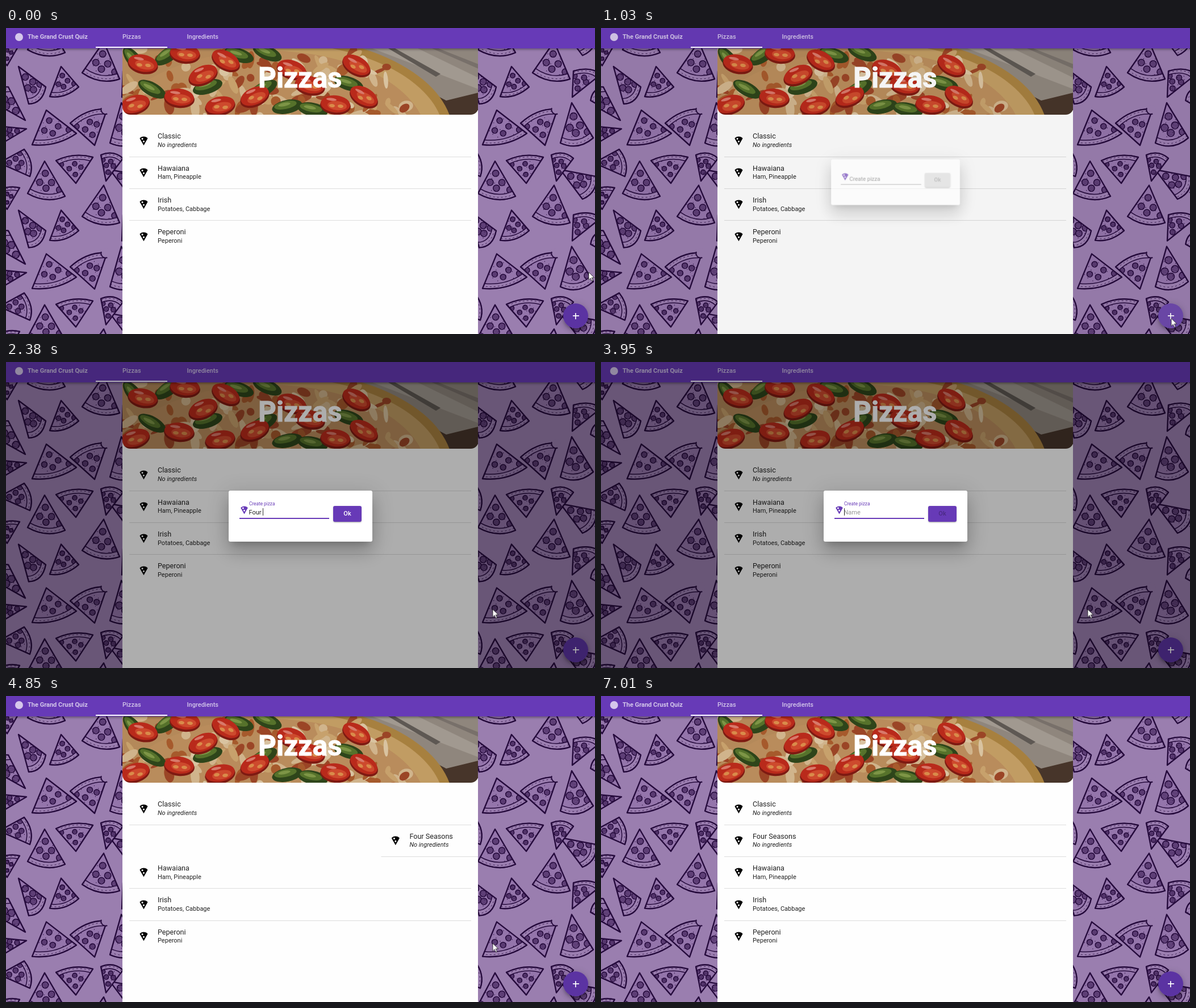
Animation of 1037 by 540 pixels, one loop 7.1 s. Source, as an HTML page with a canvas:

```html
<!DOCTYPE html>
<html lang="en">
<head>
<meta charset="utf-8">
<title>Pizzas</title>
<style>
:root { --purple: #673ab7; --swift: cubic-bezier(.25,.8,.25,1); }
html, body { margin: 0; width: 100%; height: 100%; overflow: hidden; }
body { position: relative; background: #9a7eaf; font: 11px/16px Roboto, Arial, sans-serif; color: rgba(0,0,0,.87); }
body * { box-sizing: border-box; }
.abs, header, main, .fab, .backdrop, .dialog, .cursor, header *, .row *, .dialog * { position: absolute; }
span, h1 { white-space: pre; }
.loop, .loop::after { animation: 7100ms linear infinite; }

header { left: 0; top: 0; width: 1037px; height: 35.5px; background: var(--purple); color: rgba(255,255,255,.72);
  font-weight: 500; box-shadow: 0 2px 4px rgba(0,0,0,.35); z-index: 1; }
header span { top: 8px; }
.brand { left: 38px; font-weight: 700; }
.mark { left: 16px; top: 9px; width: 14px; height: 14px; border-radius: 50%; background: #d5c7eb; }
.ink { left: 158px; top: 33px; width: 125.5px; height: 2px; background: #fff; }

main { left: 204.5px; top: 36px; width: 626.5px; height: 504px; background: #fefefe; overflow: hidden; }
#photo { left: 0; top: 0; border-radius: 0 0 14px 14px; }
h1 { left: 0; top: 22px; width: 100%; margin: 0; text-align: center; font-size: 49.5px; line-height: 60px;
  font-weight: 700; color: #fff; -webkit-text-stroke: .9px #fff; }
.list { left: 12.5px; top: 135.3px; width: 602px; }
.row { position: relative; height: 56.4px; border-bottom: 1px solid rgba(0,0,0,.13); }
.row:last-child { border: 0; }
.row svg { left: 15.6px; top: 18.3px; width: 18.9px; height: 18.9px; }
.row b, .row span, .row i { left: 50px; white-space: pre; }
.row b { top: 12px; font-size: 12.6px; font-weight: 400; }
.row span, .row i { top: 27.6px; }
.slot { height: 0; animation-name: grow; }
.fresh { animation-name: slide; }
@keyframes grow { 0%, 57.789% { height: 0; } 66.127%, 100% { height: 56.4px; } }
@keyframes slide {
  0%, 57.788% { transform: translateX(602px); visibility: hidden; }
  57.789%, 66.127% { transform: translateX(602px); visibility: visible; }
  74.465%, 100% { transform: none; visibility: visible; }
}

.fab { left: 981px; top: 486px; width: 44px; height: 44px; border-radius: 50%; background: #5b33a2; overflow: hidden; }
.shade { left: 981px; top: 486px; width: 44px; height: 44px; border-radius: 50%;
  box-shadow: 0 3px 4px -1px rgba(0,0,0,.2), 0 5px 8px rgba(0,0,0,.16), 0 1px 14px rgba(0,0,0,.14); }
.fab::before { content: ""; position: absolute; left: 16.5px; top: 16.5px; width: 11px; height: 11px;
  background: linear-gradient(#fff, #fff) 50%/100% 1.7px no-repeat, linear-gradient(#fff, #fff) 50%/1.7px 100% no-repeat; }
.fab::after { content: ""; position: absolute; left: -22px; top: -16px; width: 96px; height: 96px; border-radius: 50%;
  background: #fff; animation-name: ripple; }
@keyframes ripple {
  0%, 11.2% { transform: scale(0); opacity: .13; animation-timing-function: cubic-bezier(0,0,.2,1); }
  13.8% { transform: none; opacity: .13; }
  19.2%, 100% { transform: none; opacity: 0; }
}

.backdrop { inset: 0; background: rgba(0,0,0,.32); z-index: 2; animation-name: dim; }
@keyframes dim {
  0%, 13.873% { opacity: 0; animation-timing-function: var(--swift); }
  19.507% { opacity: 1; }
  55.873% { opacity: 1; animation-timing-function: var(--swift); }
  61.507%, 100% { opacity: 0; }
}
.dialog { left: 391.5px; top: 227px; width: 253px; height: 90px; background: #fff; border-radius: 3px; z-index: 3;
  box-shadow: 0 9px 12px -6px rgba(0,0,0,.2), 0 19px 30px 2px rgba(0,0,0,.14), 0 7px 36px 6px rgba(0,0,0,.12);
  animation-name: pop; }
@keyframes pop {
  0%, 13.873% { opacity: 0; transform: scale(.7); animation-timing-function: cubic-bezier(0,0,.2,1); }
  15.986% { opacity: 1; transform: none; }
  55.845% { opacity: 1; transform: none; animation-timing-function: cubic-bezier(.4,0,.2,1); }
  56.901%, 100% { opacity: 0; transform: none; }
}
.dialog svg { left: 18.5px; top: 25.5px; width: 17px; height: 17px; fill: var(--purple); }
.label { left: 35.5px; top: 15.5px; color: var(--purple); transform-origin: 0 50%; animation-name: float; }
@keyframes float {
  0%, 15.915% { transform: translateY(15.4px); color: rgba(0,0,0,.54); animation-timing-function: var(--swift); }
  21.549%, 100% { transform: scale(.75); color: var(--purple); }
}
.hint { left: 35.5px; top: 30.5px; color: rgba(0,0,0,.42); animation-name: hint; }
@keyframes hint {
  0%, 15.915% { opacity: 0; animation-timing-function: var(--swift); }
  21.549%, 100% { opacity: 1; }
}
#typed { left: 35.5px; top: 30.5px; border-right: 1px solid #333; height: 13px; line-height: 16px; animation-name: caret; }
@keyframes caret { 0%, 15.985% { visibility: hidden; } 15.986%, 100% { visibility: visible; } }
.rule { left: 18.5px; top: 49px; width: 158px; height: 1px; background: rgba(0,0,0,.42); }
.focus { left: 18.5px; top: 48px; width: 158px; height: 2px; background: var(--purple); animation-name: focus; }
@keyframes focus {
  0%, 15.915% { transform: scaleX(.5); opacity: 0; animation-timing-function: var(--swift); }
  20.14%, 100% { transform: none; opacity: 1; }
}
.ok { left: 184px; top: 26.5px; width: 50px; height: 28.5px; border-radius: 3px; text-align: center; line-height: 28px;
  font-weight: 500; box-shadow: 0 2px 2px -1px rgba(0,0,0,.2), 0 1px 3px rgba(0,0,0,.2); animation-name: enable; }
@keyframes enable {
  0%, 23.52% { background: #dedede; color: rgba(0,0,0,.28); }
  23.521% { background: #dedede; color: #fff; animation-timing-function: var(--swift); }
  29.155%, 55.56% { background: #673ab7; color: #fff; }
  55.563% { background: #673ab7; color: rgba(0,0,0,.28); }
  55.7% { background: #673ab7; color: rgba(0,0,0,.28); animation-timing-function: var(--swift); }
  61.2%, 100% { background: #dedede; color: rgba(0,0,0,.28); }
}

.cursor { left: 0; top: 0; width: 13px; height: 18px; z-index: 4; animation-name: move; }
@keyframes move {
  0%, 1.65% { transform: translate(1025px,430px); animation-timing-function: ease-in-out; }
  5.775%, 14.085% { transform: translate(1006px,513px); animation-timing-function: ease-in-out; }
  18.451%, 86.75% { transform: translate(856px,435.5px); animation-timing-function: ease-in; }
  90.141%, 100% { transform: translate(955px,541px); }
}
</style>
</head>
<body>
<svg width="0" height="0" class="abs"><symbol id="slice" viewBox="0 0 24 24"><path d="M12 2C8.43 2 5.23 3.54 3.01 6L12 22l8.99-16C18.78 3.55 15.57 2 12 2zM7 7c0-1.1.9-2 2-2s2 .9 2 2-.9 2-2 2-2-.9-2-2zm5 8c-1.1 0-2-.9-2-2s.9-2 2-2 2 .9 2 2-.9 2-2 2z"/></symbol></svg>
<canvas id="wall" class="abs" style="left:0;top:0" width="1037" height="540"></canvas>
<header>
  <div class="mark"></div><span class="brand">The Grand Crust Quiz</span>
  <span style="left:205px">Pizzas</span><span style="left:318.5px">Ingredients</span>
  <div class="ink"></div>
</header>
<main>
  <canvas id="photo" class="abs" width="627" height="117"></canvas>
  <h1 class="abs">Pizzas</h1>
  <div class="list abs">
    <div class="row"><svg><use href="#slice"/></svg><b>Classic</b><i>No ingredients</i></div>
    <div class="slot loop"><div class="row fresh loop" style="border-bottom:1px solid rgba(0,0,0,.13)"><svg><use href="#slice"/></svg><b>Four Seasons</b><i>No ingredients</i></div></div>
    <div class="row"><svg><use href="#slice"/></svg><b>Hawaiana</b><span>Ham, Pineapple</span></div>
    <div class="row"><svg><use href="#slice"/></svg><b>Irish</b><span>Potatoes, Cabbage</span></div>
    <div class="row"><svg><use href="#slice"/></svg><b>Peperoni</b><span>Peperoni</span></div>
  </div>
</main>
<div class="shade abs"></div>
<div class="fab loop"></div>
<div class="backdrop loop"></div>
<div class="dialog loop">
  <svg><use href="#slice"/></svg>
  <span class="label loop">Create pizza</span>
  <span class="hint loop" id="hint">Name</span>
  <span class="loop" id="typed"></span>
  <div class="rule"></div><div class="focus loop"></div>
  <div class="ok loop">Ok</div>
</div>
<svg class="cursor loop" viewBox="0 0 13 18"><path d="M1 1v13.5l3.2-3 2.2 5 2.1-.9-2.2-4.9h4.4z" fill="#fff" stroke="#222" stroke-width=".8"/></svg>
<script>
const $ = id => document.getElementById(id);
const mix = (p, q, k) => [p[0] + (q[0] - p[0]) * k, p[1] + (q[1] - p[1]) * k];
let seed = 7;
const rnd = () => (seed = seed * 16807 % 2147483647) / 2147483647;

// Wallpaper: each slice is tip, crust end, crust end inside one repeating tile
const slices = [
  [22,68, 70,104, 40,134], [97,68, 128,104, 77,121], [172,24, 200,90, 134,79],
  [71,145, 124,186, 46,206], [156,207, 113,168, 178,143], [-12,238, 32,214, 42,262],
  [68,235, 104,297, 38,292], [123,274, 88,234, 153,228], [183,250, 246,262, 222,302],
  [203,132, 241,194, 183,203], [204,122, 206,76, 254,82], [176,270, 167,224, 206,230],
  [34,163, -28,128, 4,104], [36,178, -14,173, -6,203], [2,320, -20,290, 24,282]
];
const bite = 4, tileW = 264.33, tileH = 253.6, dark = '#250a3c', tint = '#9a7eaf';

function drawSlice(c, p, bitten) {
  const T = [p[0], p[1]], A = [p[2], p[3]], B = [p[4], p[5]];
  const mid = mix(A, B, .5), size = Math.hypot(mid[0] - T[0], mid[1] - T[1]);
  const bulge = k => mix(T, mid, k * 1.28);
  const arc = k => c.quadraticCurveTo(...bulge(k), ...mix(T, B, k));
  const at = (k, s) => mix(mix(T, A, k), mix(T, B, k), s);
  const dot = (q, r) => { c.beginPath(); c.arc(q[0], q[1], r, 0, 7); };
  const outline = () => { c.beginPath(); c.moveTo(...T); c.lineTo(...A); arc(1); c.closePath(); };
  c.save();
  c.lineJoin = 'round';
  c.strokeStyle = dark;
  outline(); c.fillStyle = '#9475ab'; c.fill();
  c.save(); c.clip();
  for (const [k, s] of [[.36, .5], [.62, .25], [.64, .75], [.8, .5], [.82, .06]]) {
    const q = at(k, s), r = size * .095;
    dot(q, r); c.fillStyle = '#7c5b95'; c.fill(); c.lineWidth = 1.5; c.stroke();
    c.lineWidth = .8;
    c.beginPath();
    for (let d = -.6; d < .9; d += .4) {
      const h = Math.sqrt(1 - d * d) * r;
      c.moveTo(q[0] - h, q[1] + d * r); c.lineTo(q[0] + h, q[1] + d * r - 1);
    }
    c.stroke();
  }
  for (let i = 0; i < 16; i++) { dot(at(.25 + i / 16 * .72, i * .618 % 1), .7); c.fillStyle = dark; c.fill(); }
  c.restore();
  // crust band
  c.beginPath(); c.moveTo(...mix(T, A, .86)); arc(.86); c.lineTo(...B);
  c.quadraticCurveTo(...bulge(1), ...A); c.closePath();
  c.fillStyle = '#9b7eb0'; c.fill(); c.lineWidth = 1.5; c.stroke();
  c.lineWidth = .8; c.setLineDash([3, 4]);
  c.beginPath(); c.moveTo(...mix(T, A, .94)); arc(.94); c.stroke();
  c.setLineDash([]);
  outline(); c.lineWidth = 2.4; c.stroke();
  if (bitten) {
    dot(mix(B, mid, .08), 8); c.fillStyle = tint; c.fill();
    c.beginPath(); c.arc(...mix(B, mid, .08), 8, 1.2, 3.5); c.lineWidth = 2; c.stroke();
  }
  c.restore();
}

const wall = $('wall').getContext('2d');
wall.fillStyle = tint;
wall.fillRect(0, 0, 1037, 540);
for (let i = -1; i < 5; i++) for (let j = -1; j < 3; j++) {
  wall.save();
  wall.translate(i * tileW, j * tileH);
  slices.forEach((p, n) => drawSlice(wall, p, n === bite));
  wall.restore();
}

// Banner: flat impression of a pizza on a table
const ph = $('photo').getContext('2d');
function blob(x, y, rx, ry, turn, fill) {
  ph.beginPath(); ph.ellipse(x, y, rx, ry, turn, 0, 7); ph.fillStyle = fill; ph.fill();
}
function poly(fill, ...pts) {
  ph.beginPath(); pts.forEach(q => ph.lineTo(...q)); ph.fillStyle = fill; ph.fill();
}
ph.fillStyle = '#47352a'; ph.fillRect(0, 0, 627, 117);
poly('#8f867d', [390, 0], [627, 0], [627, 78], [570, 92], [490, 50]);
poly('#a19990', [440, 0], [520, 0], [627, 52], [627, 72]);
poly('#5e5853', [468, 0], [480, 0], [560, 45], [552, 50]);
poly('#78706a', [545, 0], [556, 0], [627, 28], [627, 36]);
blob(270, 152, 312, 174, 0, '#a7803f');
blob(266, 154, 300, 164, 0, '#c19c63');
ph.fillStyle = '#b4895a'; ph.fillRect(0, 0, 270, 117);
blob(255, 158, 280, 154, 0, '#b98c5c');
for (let i = 0; i < 130; i++) {
  const x = rnd() * 505, y = Math.max(0, (x - 400) * .5) + rnd() * 120;
  const tone = ['#d0b48c', '#a65a2c', '#c7a16c', '#9b4526', '#d9c3a0'][i % 5];
  blob(x, y, 6 + rnd() * 14, 3 + rnd() * 7, rnd() * 3, tone);
}
const basil = [[52,72,.5], [80,12,-.6], [150,68,-.3], [205,12,.3], [248,72,-.5], [290,103,-.2], [335,108,.2], [398,62,.3], [255,8,.4], [20,20,.9]];
for (const [x, y, r] of basil) {
  blob(x, y, 27, 12, r, '#2e451a');
  blob(x - 3, y - 3, 20, 7, r, '#56722b');
  blob(x - 5, y - 4, 11, 3, r, '#7d9546');
}
const tomato = [[36,26,.2], [100,86,.1], [142,46,-.4], [182,20,.5], [110,8,.1], [172,100,-.2], [233,84,-.4], [298,36,.3], [330,64,.2], [412,29,.5], [425,84,.5], [22,98,-.3], [375,98,.1]];
for (const [x, y, r] of tomato) {
  blob(x, y + 3, 27, 16, r, '#7e1a12');
  blob(x, y, 26, 15, r, '#b92a1b');
  blob(x + 3, y + 3, 17, 8, r, '#cd4a2d');
  blob(x - 6, y + 3, 5, 3, r, '#d98b4a');
  blob(x + 9, y + 4, 5, 3, r, '#d98b4a');
  blob(x - 7, y - 8, 9, 2.5, r, '#d8796a');
}

// Typing
const name = 'Four Seasons', reset = 3945;
const keys = [1670, 1790, 1950, 2130, 2380, 2660, 2910, 3110, 3220, 3330, 3440, 3620];
let start;
function tick(now) {
  start ??= now;
  const t = (now - start) % 7100;
  const count = t < reset ? keys.filter(k => k <= t).length : 0;
  $('typed').textContent = name.slice(0, count);
  $('hint').style.visibility = count ? 'hidden' : 'visible';
  requestAnimationFrame(tick);
}
requestAnimationFrame(tick);
</script>
</body>
</html>
```
